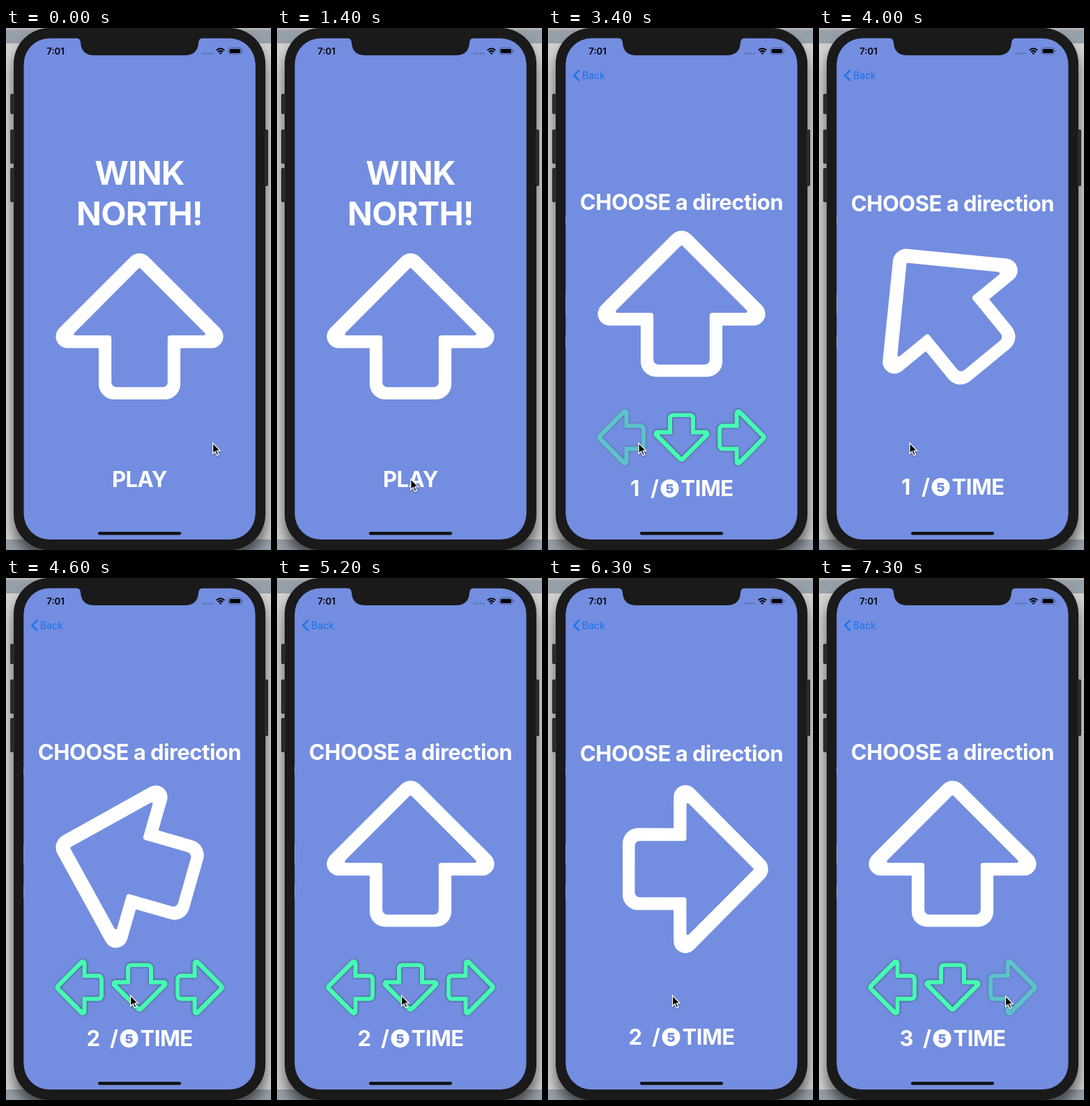
These frames come from a looping animation (380 by 746 pixels, 7400 ms). An HTML page:

```html
<!DOCTYPE html>
<html lang="en">
<head>
<meta charset="utf-8">
<title>Arrow game</title>
<style>
html, body { margin: 0; width: 100%; height: 100%; overflow: hidden; }
svg { display: block; width: 100vw; height: 100vh; }
text { font-family: Inter, "Liberation Sans", sans-serif; font-weight: 600; white-space: pre; }
.page { fill: #fff; }
.page text { font-size: 31px; font-weight: 700; letter-spacing: -.016em; }
.mid { text-anchor: middle; }
.page .big { font-size: 47px; }
.page .badge { font-size: 18px; font-weight: 900; letter-spacing: 0; fill: #738de0; }
.sheet { fill: #738de0; }
.choice { fill: #47fab4; filter: drop-shadow(0 1px 4px rgba(0, 0, 0, .6)); }
.body { fill: #1a1a1b; filter: drop-shadow(0 14px 9px rgba(0, 0, 0, .55)); }
</style>
</head>
<body>
<svg viewBox="0 0 380 746">
  <defs>
    <clipPath id="screen"><rect x="25.5" y="14.7" width="332" height="716.3" rx="37"/></clipPath>
    <path id="arrow" fill-rule="evenodd"/>
  </defs>

  <rect width="380" height="746" fill="#d2d2d2"/>
  <path d="M0 0H380V22H0ZM0 731H380V746H0Z" fill="#98a0aa"/>
  <path d="M0 0H380V3H0Z" fill="#b3b3b1"/>
  <rect class="body" x="11" y="0" width="361" height="746" rx="51"/>
  <g fill="#2b2b2c">
    <rect x="6" y="94" width="6" height="29" rx="2"/>
    <rect x="6" y="145" width="6" height="49" rx="2"/>
    <rect x="6" y="200" width="6" height="49" rx="2"/>
    <rect x="371" y="145" width="5" height="81" rx="2"/>
  </g>

  <g clip-path="url(#screen)">
    <g id="home" class="page">
      <rect class="sheet" x="25" y="14" width="333" height="718"/>
      <text class="big mid" x="191.5" y="224">WINK</text>
      <text class="big mid" x="191.5" y="282">NORTH!</text>
      <use href="#arrow" transform="translate(191.5 446.3)"/>
      <text id="play" class="mid" x="191.5" y="656">PLAY</text>
    </g>
    <rect id="dim" x="25" y="14" width="333" height="718"/>
    <g id="game" class="page">
      <rect class="sheet" x="25" y="14" width="333" height="718"/>
      <g id="content">
        <text class="mid" x="191.5" y="260">CHOOSE a direction</text>
        <use id="spinner" href="#arrow"/>
      </g>
      <g id="score">
        <text id="count" y="669"></text>
        <g id="total">
          <text x="147" y="669">/</text>
          <circle cx="174.5" cy="658" r="13"/>
          <text class="badge mid" x="174.5" y="664.5">5</text>
          <text x="190.5" y="669">TIME</text>
        </g>
      </g>
      <g id="choices">
        <use class="choice" href="#arrow" transform="translate(111.8 585) rotate(-90) scale(.3333)"/>
        <use class="choice" href="#arrow" transform="translate(191.5 578.3) rotate(180) scale(.3333)"/>
        <use class="choice" href="#arrow" transform="translate(271.3 585) rotate(90) scale(.3333)"/>
      </g>
    </g>
    <g id="back">
      <path id="chevron" d="M45 60L37.3 67.7L45 75.4" fill="none" stroke="#1673f0" stroke-width="2.3"/>
      <text x="49" y="72.7" fill="#1673f0" style="font-size:14px;font-weight:400">Back</text>
    </g>
  </g>

  <path d="M100 14Q107 15 107 21Q108 39 127 39H256Q275 39 276 21Q276 15 283 14Z" fill="#1a1a1b"/>
  <text class="mid" x="71" y="37.5" style="font-size:13px">7:01</text>
  <g fill="#5a71b5">
    <circle cx="283" cy="36.5" r="1.4"/><circle cx="287.3" cy="36.5" r="1.4"/>
    <circle cx="291.6" cy="36.5" r="1.4"/><circle cx="295.9" cy="36.5" r="1.4"/>
  </g>
  <g fill="none" stroke="#000" stroke-width="2">
    <path d="M301.7 31.8Q307.5 26.6 313.3 31.8M303.9 34.3Q307.5 31 311.1 34.3"/>
    <path d="M305.4 35.8Q307.5 34.4 309.6 35.8L307.5 38Z" fill="#000" stroke="none"/>
    <rect x="319" y="28.3" width="18.5" height="9.4" rx="2.8" stroke="#4a5e98" stroke-width="1"/>
    <rect x="320.6" y="29.9" width="15.3" height="6.2" rx="1.5" fill="#000" stroke="none"/>
    <path d="M339.2 31.6V34.6" stroke="#4a5e98" stroke-width="1.2"/>
  </g>
  <rect x="132" y="720" width="119" height="4.4" rx="2.2" fill="#111"/>
  <path id="cursor" d="M0 0V15.2L3.5 12L6 17.8L8.5 16.7L6.1 11.1H10.7Z" fill="#000" stroke="#fff" stroke-width="1.3"
    style="filter:drop-shadow(0 1px 1px rgba(0,0,0,.35))"/>
</svg>
<script>
const $ = id => document.getElementById(id);
const set = (id, attrs) => { for (const k in attrs) $(id).setAttribute(k, attrs[k]); };
const clamp = x => Math.max(0, Math.min(1, x));

// Closed path through [x, y, radius] corners of the right half and its mirror image.
function roundShape(half) {
  const pts = [...half, ...half.slice(1).reverse().map(([x, y, r]) => [-x, y, r])];
  return pts.map(([x, y, r], i) => {
    const unit = ([px, py]) => {
      const d = Math.hypot(px - x, py - y);
      return [(px - x) / d, (py - y) / d];
    };
    const a = unit(pts.at(i - 1)), b = unit(pts[(i + 1) % pts.length]);
    const cut = r / Math.tan(Math.acos(a[0] * b[0] + a[1] * b[1]) / 2);
    const sweep = a[0] * b[1] - a[1] * b[0] < 0 ? 1 : 0;
    return `${i ? "L" : "M"}${x + a[0] * cut} ${y + a[1] * cut}` +
      `A${r} ${r} 0 0 ${sweep} ${x + b[0] * cut} ${y + b[1] * cut}`;
  }).join("") + "Z";
}
set("arrow", { d:
  roundShape([[0, -132, 19], [144, 11.3, 16.8], [58.6, 11.3, 1], [58.6, 84.5, 22]]) +
  roundShape([[0, -104, 2], [97, -7, 2], [40.3, -7, 4], [40.3, 67, 7]]) });

const LOOP = 7400, PUSH = 2400, SPEED = .5422, HIDE = 1000, PRESS = 200;
const spins = [3409.5, 5471, 7471];
const choices = [...$("choices").children];
// [start, end, x, y]: the pointer glides to x, y between start and end.
const moves = [[0, 0, 296.5, 593], [1000, 1400, 191.8, 644.5], [2450, 2650, 192.5, 648],
  [2850, 3200, 130, 593], [4100, 4500, 178.5, 596.5], [6500, 7000, 267.5, 597.5]];

function pointer(t) {
  let x = 0, y = 0;
  for (const [start, end, px, py] of moves) {
    if (t < start) break;
    const u = end > start ? clamp((t - start) / (end - start)) : 1;
    const e = u * u * (3 - 2 * u);
    x += (px - x) * e;
    y += (py - y) * e;
  }
  return `translate(${x} ${y})`;
}

function draw(t) {
  const w = Math.max(0, t - PUSH) * .013;
  const p = t > 3200 ? 1 : 1 - (1 + w) * Math.exp(-w);
  set("home", { transform: `translate(${-99.5 * p} 0)` });
  set("dim", { opacity: .12 * p });
  set("game", { transform: `translate(${332 * (1 - p)} 0)` });
  set("back", { transform: `translate(${-20 * (1 - p)} ${45 * (1 - p)})`, opacity: p });
  set("chevron", { opacity: clamp((p - .9) * 10) });
  set("play", { opacity: t > PUSH - PRESS && t < PUSH ? .4 : 1 });

  const hidden = spins.some(s => t >= s && t < s + HIDE);
  const round = 1 + spins.filter(s => t >= s + HIDE).length;
  const last = spins.filter(s => t >= s).pop();
  const angle = last ? Math.min(720, (t - last) * SPEED) : 0;
  const shift = hidden ? 2 : 0;
  set("content", { transform: `translate(0 ${shift})` });
  set("score", { transform: `translate(0 ${-shift})` });
  set("spinner", { transform: `translate(191.5 414) rotate(${angle})` });
  $("count").textContent = round;
  set("count", { x: round > 1 ? 115.5 : 118 });
  set("total", { transform: `translate(${round > 1 ? 2 : 0} 0)` });
  set("choices", { visibility: hidden ? "hidden" : "visible" });
  choices.forEach((c, i) => {
    const pressed = t >= spins[i] - PRESS && t < spins[i];
    c.setAttribute("opacity", pressed ? .5 : 1);
  });
  set("cursor", { transform: pointer(t) });
}

const begin = performance.now();
function tick(now) {
  draw(Math.max(0, now - begin) % LOOP);
  requestAnimationFrame(tick);
}
draw(0);
requestAnimationFrame(tick);
</script>
</body>
</html>
```
